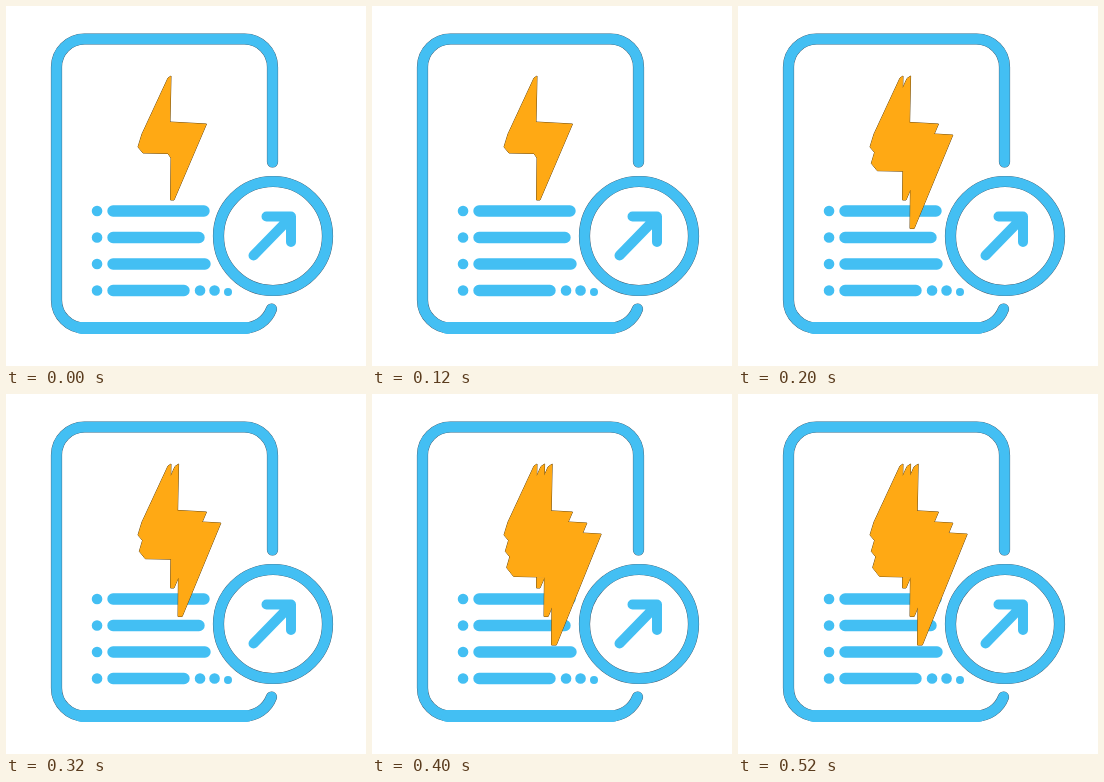
An HTML page that plays this animation: 360 by 360 pixels, repeating every 600 ms.

```html
<!DOCTYPE html>
<html>
<head>
<meta charset="utf-8">
<style>
html, body { margin: 0; width: 100%; height: 100%; overflow: hidden; background: #fff; }
svg { display: block; width: 100vw; height: 100vh; }
.line { fill: none; stroke: #43bff3; stroke-width: 10.5; stroke-linecap: round; stroke-linejoin: round; }
.rim { fill: none; stroke: #456; stroke-width: 11.2; stroke-linecap: round; }
#bolt { fill: #ffa914; stroke: #6b4a10; stroke-width: 1; stroke-linejoin: round; paint-order: stroke; }
</style>
</head>
<body>
<svg viewBox="0 0 360 360">
  <defs>
    <path id="page" d="M266.5 156V61A28 28 0 0 0 238.5 33H78.5A28 28 0 0 0 50.5 61V294A28 28 0 0 0 78.5 322H238A29 29 0 0 0 265.5 303"/>
    <circle id="badge" cx="267" cy="230" r="54.5"/>
  </defs>
  <use href="#page" class="rim"/>
  <use href="#page" class="line"/>
  <path class="line" stroke-linecap="butt" style="stroke-width:12" d="M75 322H241"/>
  <path class="line" style="stroke-width:11.4" d="M107 205H198M107 231.5H193M107 258H199M107 284.5H178"/>
  <path class="line" d="M91 205h.1M91 231.5h.1M91 258h.1M91 284.5h.1M194 284.5h.1M208.5 284.5h.1"/>
  <circle cx="222" cy="286" r="4" fill="#43bff3"/>
  <path id="bolt"/>
  <use href="#badge" class="rim"/>
  <use href="#badge" class="line"/>
  <path class="line" style="stroke-width:10" d="M247.5 249.5 285 211M260.5 210.5H285V236"/>
</svg>
<script>
const corners = [[165, 70], [164, 116], [200.5, 118], [168, 194], [164.5, 194],
  [165, 152], [162, 147.5], [137, 147], [132, 141], [136, 128], [162, 72]];
const bolt = document.getElementById("bolt");
const start = performance.now();

// The bolt grows from its upper left.
function outline(step) {
  const points = corners.map(([x, y]) => [
    125 + (x - 125) * (1 + 0.19 * step),
    70 + (y - 70) * (1 + 0.23 * step)
  ]);
  return `M${points.join(" ")}Z`;
}

// Earlier sizes stay visible until the loop restarts.
function draw(now) {
  const step = Math.floor((Math.max(0, now - start) % 600) / 200);
  let trail = "";
  for (let i = 0; i <= step; i++) trail += outline(i);
  bolt.setAttribute("d", trail);
  requestAnimationFrame(draw);
}
draw(start);
</script>
</body>
</html>
```
